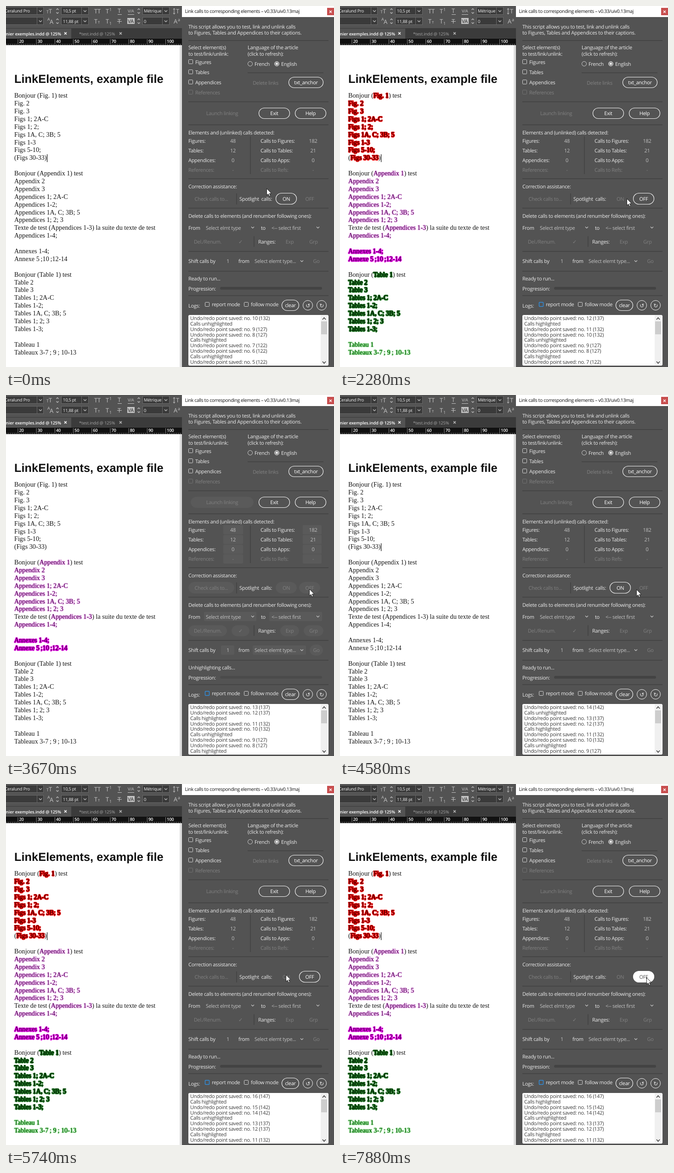
An HTML page that plays this animation: 714x784 px, repeating every 8 s.

```html
<!DOCTYPE html>
<html lang="en">
<head>
<meta charset="utf-8">
<title>Link calls to corresponding elements</title>
<style>
html, body { margin: 0; width: 100%; height: 100%; overflow: hidden; background: #fff; }
svg { position: absolute; left: 0; top: 0; width: 714px; height: 784px; }
text { font: 11px "Open Sans", "Noto Sans", sans-serif; letter-spacing: -.31px; fill: #ececec; white-space: pre; text-rendering: geometricPrecision; }
.mid { text-anchor: middle; }
.end { text-anchor: end; }
.dim { fill: #828282; }
.soft { fill: #c2c2c2; }
.title { font-size: 10.4px; letter-spacing: -.37px; fill: #111; }
.bar { font-size: 9.4px; letter-spacing: -.2px; fill: #f4f4f4; }
.tab { font-size: 9.3px; font-weight: 600; letter-spacing: -.1px; fill: #fff; }
.tab.idle { font-weight: 400; fill: #a6a6a6; }
.num { font-size: 9.4px; font-weight: 600; fill: #fff; }
.ico { font-size: 13px; fill: #c4c4c4; letter-spacing: -.5px; }
.sub { font-size: 9px; fill: #c4c4c4; }
.log text { fill: #3a3a3a; }
.head { font: bold 25.4px "Liberation Sans", Arial, sans-serif; letter-spacing: 0; fill: #111; }
.sep { stroke: #454545; stroke-width: 2; }
.chev { fill: none; stroke: #c8c8c8; stroke-width: 1.2; }
.field { fill: #3a3a3a; stroke: #6a6a6a; }
.box { fill: none; stroke: #d4d4d4; }
.box.dimbox { stroke: #727272; }
.blue #report { stroke: #2f8fe0; stroke-width: 1.4; }
.btn rect { fill: none; stroke: #f2f2f2; stroke-width: 1.2; }
.btn text { fill: #fff; }
.off rect, .well, .deepwell { fill: none; }
.off text { fill: #808080; }
.busy .off:not(.launch) rect, .deep .launch rect { fill: #5a5a5a; stroke: #5a5a5a; }
.busy .well, .deep .deepwell { fill: #5a5a5a; }
.hover rect { fill: #fff; stroke: #fff; stroke-width: 1.2; }
.hover text { fill: #505050; }
.press rect { fill: #459df2; stroke: #459df2; stroke-width: 1.2; }
.press text { fill: #fff; }
#track { fill: #434343; }
.busy #track { fill: #4b4b4b; }
#doc { position: absolute; left: 18px; top: 186.2px; color: #141414;
  font: 14.2px/16.9px "Liberation Serif", "Times New Roman", serif; white-space: pre; }
#doc div { height: 16.9px; }
#doc span { --a: 0 0 2px var(--c); }
.fig { --c: #ff0000; --k: #380000; }
.app { --c: #ee84ee; --k: #4a1050; }
.ann { --c: #f400f4; --k: #48004e; }
.tab1 { --c: #1d7a22; --k: #001a02; }
.tab2 { --c: #4fe04f; --k: #06400a; }
.all span, .part .app, .part .ann { color: var(--k); text-shadow: var(--a), var(--a), var(--a); }
.all .fig, .all .ann, .all .tab1, .part .ann {
  -webkit-text-stroke: .3px var(--k);
  text-shadow: 1.5px 0 var(--c), -1.5px 0 var(--c), 0 1.5px var(--c), 0 -1.5px var(--c),
    1px 1px var(--c), -1px -1px var(--c), 1px -1px var(--c), -1px 1px var(--c), var(--a), var(--a);
}
</style>
</head>
<body>
<svg id="ui" viewBox="0 0 714 784"></svg>
<div id="doc"></div>
<svg viewBox="0 0 714 784">
  <g id="tip">
    <rect x="2" y="2" width="74" height="17" fill="#000" opacity=".25"/>
    <rect id="tipBox" x=".5" y=".5" width="74" height="16" fill="#fff" stroke="#767676"/>
    <text id="tipText" x="5" y="12" style="fill:#555"></text>
  </g>
  <g id="ring" fill="none" stroke-width="3">
    <circle r="5.5" stroke="#2b8ae2"/>
    <path d="M0-5.500A5.500 5.500 0 0 1 5.500 0" stroke="#62b0f6"/>
  </g>
  <path id="arrow" d="M.5.5V15L3.8 12 6.2 17.2 8.6 16.2 6.3 11.2H10.9Z" fill="#fff" stroke="#111" stroke-width=".9"/>
</svg>
<script>
const $ = id => document.getElementById(id);
const out = [];
const add = s => out.push(s);
const text = (x, y, s, cls = '') => add(`<text x="${x}" y="${y}" class="${cls}">${s}</text>`);
const rect = (x, y, w, h, fill) => add(`<rect x="${x}" y="${y}" width="${w}" height="${h}" fill="${fill}"/>`);
const well = (x, y, w, h, cls = 'well') => add(`<rect x="${x}" y="${y}" width="${w}" height="${h}" rx="2" class="${cls}"/>`);
const line = (x1, y1, x2, y2) => add(`<path class="sep" d="M${x1} ${y1}L${x2} ${y2}"/>`);
const chev = (x, y, up = 1, r = 3) => add(`<path class="chev" d="M${x - r} ${y - up * r / 2}l${r} ${up * r}l${r} ${-up * r}"/>`);
const check = (x, y, cls = '', id = '') => add(`<rect ${id && `id="${id}"`} class="box ${cls}" x="${x}.5" y="${y}.5" width="9" height="9" rx="1"/>`);
const pill = (x, y, w, h, label, cls = 'btn', id = '') => add(
  `<g ${id && `id="${id}"`} class="${cls}"><rect x="${x + .5}" y="${y + .5}" width="${w - 1}" height="${h - 1}" rx="${h / 2}"/>` +
  `<text class="mid" x="${x + w / 2}" y="${y + h / 2 + 4}">${label}</text></g>`);

function drawEditor() {
  rect(0, 0, 383, 48, '#535353');
  rect(0, 48, 383, 23, '#3b3b3b');
  rect(0, 49, 142, 22, '#535353');
  rect(0, 71, 383, 14, '#111');
  rect(378, 85, 5, 699, '#dedede');
  for (const y of [11, 33]) {
    for (const [x, w] of [[-5, 88], [120, 60], [297, 59]])
      add(`<rect class="field" x="${x}.5" y="${y - 8.5}" width="${w - 1}" height="16"/>`);
    for (const x of [75, 172, 348]) chev(x, y);
    for (const x of [112, 289]) { chev(x, y - 4, -1, 2.5); chev(x, y + 4, 1, 2.5); }
    add(`<path d="M67.5 ${y - 8}v16M164.5 ${y - 8}v16M340.5 ${y - 8}v16" stroke="#6a6a6a"/>`);
  }
  text(52, 14, 'Ceralund Pro', 'bar end');
  text(124, 14, '10,5 pt', 'bar'); text(124, 37, '11,88 pt', 'bar');
  text(300, 14, 'Métrique', 'bar'); text(300, 37, '0', 'bar');
  text(88, 16, 'T', 'sub'); text(93, 16, 'T', 'ico');
  text(90, 32, 'A', 'sub'); text(95, 39, 'A', 'ico');
  text(192, 16, 'TT', 'ico'); text(192, 38, 'T', 'ico'); text(200, 38, 'т', 'sub');
  text(217, 16, 'T', 'ico'); text(225, 11, '1', 'sub');
  text(217, 38, 'T', 'ico'); text(225, 41, '1', 'sub');
  text(243, 15, 'T', 'ico'); text(243, 38, 'T', 'ico');
  add('<path d="M243 18.500h9M242 33.500h10M265 18.500h14M366 6v11M364 8l2-3 2 3M364 15l2 3 2-3" fill="none" stroke="#c4c4c4"/>');
  text(265, 14, 'V/A', 'sub');
  rect(264, 26, 16, 13, '#c4c4c4');
  add('<text x="265" y="37" style="font-size:11px;fill:#444;font-weight:600">VA</text>');
  text(370, 16, 'T', 'ico'); text(365, 38, 'A', 'ico'); text(374, 33, 'a', 'sub');
  text(120, 63.5, 'nier exemples.indd @ 125%', 'tab end');
  text(159, 63.5, '*test.indd @ 125%', 'tab idle');
  add('<path d="M127 57l5 5m0-5l-5 5" stroke="#fff" stroke-width="1.500"/><path d="M247 57l5 5m0-5l-5 5" stroke="#bbb" stroke-width="1.500"/>');
  let ticks = '';
  for (let i = 0; i < 95; i++) {
    const x = (1.9 + i * 4.02).toFixed(1), major = i % 10 === 6;
    ticks += `M${x} ${major ? 72 : 82}V85`;
    if (major) text(+x + 2.5, 80, i + 14, 'num');
  }
  add(`<path d="${ticks}" stroke="#b0b0b0" stroke-width=".8"/>`);
  text(18, 167, 'LinkElements, example file', 'head');
  add('<rect id="caret" x="89" y="322" width="1.200" height="17" fill="#111"/>');
}

function drawPanel() {
  rect(383, 0, 331, 784, '#535353');
  rect(383, 0, 331, 24, '#fff');
  text(389.5, 15, 'Link calls to corresponding elements – v0.33/uiv0.13maj', 'title');
  rect(699, 4, 15, 16, '#c84f4f');
  add('<path d="M704 10l5 5m0-5l-5 5" stroke="#fff" stroke-width="1.300"/>');
  text(397, 49, 'This script allows you to test, link and unlink calls');
  text(397, 62, 'to Figures, Tables and Appendices to their captions.');
  for (const y of [75, 208, 258, 375, 439, 533, 576, 629]) line(397, y, 702, y);

  text(397, 94, 'Select element(s)'); text(397, 108, 'to test/link/unlink:');
  text(526, 94, 'Language of the article'); text(526, 108, '(click to refresh):');
  ['Figures', 'Tables', 'Appendices', 'References'].forEach((s, i) => {
    check(397, 116 + i * 22, i > 2 ? 'dimbox' : '');
    text(412, 125.5 + i * 22, s, i > 2 ? 'dim' : '');
  });
  add('<circle class="box" cx="531.500" cy="125.500" r="5"/><circle cx="589.500" cy="125.500" r="5" fill="#9a9a9a" stroke="#d0d0d0"/><circle cx="589.500" cy="125.500" r="2" fill="#fff"/>');
  text(541, 130, 'French'); text(599, 130, 'English');
  line(526, 145, 691, 145);
  text(565, 171, 'Delete links', 'mid dim');
  pill(615, 154, 76, 24, 'txt_anchor');
  pill(402, 221, 137, 24, 'Launch linking', 'off launch');
  pill(550, 221, 68, 24, 'Exit'); pill(629, 221, 68, 24, 'Help');

  text(397, 279, 'Elements and (unlinked) calls detected:');
  line(532, 283, 532, 365);
  [['Figures:', 48, 'Calls to Figures:', 182], ['Tables:', 12, 'Calls to Tables:', 21],
   ['Appendices:', 0, 'Calls to Apps:', 0], ['References:', '-', 'Calls to Refs:', '-']].forEach((r, i) => {
    const y = 296.5 + i * 21.2, dim = i > 2 ? 'dim' : '';
    well(473, y - 14, 43, 20, 'deepwell'); well(646, y - 14, 41, 20, 'deepwell');
    text(397, y, r[0], dim); text(494, y, r[1], 'mid ' + (dim || 'soft'));
    text(554, y, r[2], dim); text(668.5, y, r[3], 'mid ' + (dim || 'soft'));
  });

  text(397, 396, 'Correction assistance:');
  pill(397, 406, 100, 25, 'Check calls to...', 'off');
  line(502, 407, 502, 431);
  text(508, 423, 'Spotlight  calls:');
  pill(587, 406, 46, 25, 'ON', 'btn', 'on');
  pill(638, 406, 46, 25, 'OFF', 'off', 'off');

  text(397, 460, 'Delete calls to elements (and renumber following ones):');
  well(431, 471, 114, 20); well(573, 471, 115, 20);
  text(397, 485.5, 'From'); text(435, 485.5, 'Select elmt type', 'soft'); chev(537, 481);
  text(555, 485.5, 'to'); text(578, 485.5, '&lt;-- select first', 'soft'); chev(679, 481);
  pill(397, 500, 84, 24, 'Del./Renum.', 'off'); pill(491, 500, 39, 24, '✓', 'off');
  line(540, 500, 540, 523);
  text(549, 516, 'Ranges:');
  pill(597, 500, 41, 24, 'Exp', 'off'); pill(648, 500, 43, 24, 'Grp', 'off');

  well(468, 544, 29, 20); well(537, 544, 116, 20);
  text(397, 558, 'Shift calls by'); text(483, 558, '1', 'mid soft'); text(506, 558, 'from');
  text(541, 558, 'Select elemt type...', 'soft'); chev(644, 554);
  pill(661, 542, 29, 24, 'Go', 'off');
  add('<text id="status" x="397" y="595.500"></text>');
  text(397, 617.5, 'Progression:');
  add('<rect id="track" x="466" y="610" width="222" height="6" rx="3"/>');

  text(397, 655, 'Logs:');
  check(433, 643, '', 'report'); text(448, 652, 'report mode');
  check(518, 643); text(533, 652, 'follow mode');
  pill(600, 638, 38, 24, 'clear');
  for (const [x, s] of [[657, '↺'], [687, '↻']])
    add(`<circle class="box" cx="${x}" cy="650" r="10.500" style="stroke:#f2f2f2"/><text class="mid" x="${x}" y="654.500" style="font-family:'DejaVu Sans',sans-serif;font-size:12px">${s}</text>`);
  add('<rect x="397" y="671" width="305" height="110" rx="3" fill="#fff"/><clipPath id="clip"><path d="M398 672h286v108H398z"/></clipPath><g class="log" clip-path="url(#clip)">');
  for (let i = 0; i < 10; i++) add(`<text id="row${i}" x="401" y="${682 + i * 11.85}"></text>`);
  add('</g>');
  rect(685, 672, 15, 108, '#f0f0f0'); rect(686, 685, 13, 28, '#cdcdcd');
  add('<path d="M689 681l3.500-4 3.500 4M689 772l3.500 4 3.500-4" fill="none" stroke="#404040" stroke-width="1.600"/>');
}

drawEditor();
drawPanel();
$('ui').innerHTML = out.join('');

// Brackets mark the calls that get a spotlight.
const thin = '\u2009';
const groups = [
  ['fig', 'Bonjour ([Fig. 1]) test|[Fig. 2]|[Fig. 3]|[Figs 1; 2A-C]|[Figs 1; 2;]|[Figs 1A, C; 3B; 5]|[Figs 1-3]|[Figs 5-10;]|([Figs 30-33])|'],
  ['app', 'Bonjour ([Appendix 1]) test|[Appendix 2]|[Appendix 3]|[Appendices 1; 2A-C]|[Appendices 1-2;]|[Appendices 1A, C; 3B; 5]|[Appendices 1; 2; 3]|Texte de test ([Appendices 1-3]) la suite du texte de test|[Appendices 1-4;]|'],
  ['ann', `[Annexes 1-4;]|[Annexe 5${thin};10${thin};12-14]|`],
  ['tab1', 'Bonjour ([Table 1]) test|[Table 2]|[Table 3]|[Tables 1; 2A-C]|[Tables 1-2;]|[Tables 1A, C; 3B; 5]|[Tables 1; 2; 3]|[Tables 1-3;]|'],
  ['tab2', `[Tableau 1]|[Tableaux 3-7${thin}; 9${thin}; 10-13]`]
];
$('doc').innerHTML = groups.map(([cls, lines]) => lines.split('|').map(s =>
  `<div>${s.replace('[', `<span class="${cls}">`).replace(']', '</span>')}</div>`).join('')).join('');

function logRows(n) {
  const rows = [];
  for (; rows.length < 10; n--) {
    rows.push(`Undo/redo point saved: no. ${n} (${122 + 5 * Math.max(0, Math.floor((n - 6) / 2))})`);
    if (n % 2 === 0) rows.push(n % 4 ? 'Calls unhighlighted' : 'Calls highlighted');
  }
  return rows;
}

const ready = 'Ready to run...';
const onTip = ['Highlight calls', 74], offTip = ['Unhighlight calls', 86];
const idleOff = { on: 'btn', off: 'off', mode: '', status: ready };
const idleOn = { on: 'off', off: 'btn', mode: 'all blue', status: ready };
// [time, changes that stay until set again]
const steps = [
  [0, { ...idleOff, at: [567, 396], ring: null, tip: null, log: 10, caret: 1 }],
  [150, { at: [596, 403] }],
  [300, { at: [613, 413], on: 'hover' }],
  [450, { at: [614, 414] }],
  [1040, { tip: [614, 433, 1, onTip] }],
  [1190, { tip: null, at: null, ring: [615, 417], on: 'off', mode: 'busy blue', status: 'Highlighting calls...', log: 11 }],
  [1340, { at: [614, 415], ring: null }],
  [1490, { ...idleOn, log: 12 }],
  [2280, { at: [624, 418] }],
  [2430, { at: [631, 419] }],
  [2550, { at: [641, 419], off: 'hover' }],
  [2670, { at: [651, 420] }],
  [2790, { at: [659, 420] }],
  [2940, { at: [660, 421] }],
  [3220, { tip: [660, 438, .5, offTip] }],
  [3370, { tip: [660, 438, 1, offTip] }],
  [3670, { tip: null, off: 'off', mode: 'busy deep part blue', status: 'Unhighlighting calls...', log: 13, caret: 0 }],
  [3790, { mode: 'busy deep blue' }],
  [3910, { ...idleOff, log: 14, caret: 1 }],
  [4340, { at: [656, 422] }],
  [4460, { at: [650, 422] }],
  [4580, { at: [645, 422] }],
  [4730, { at: [636, 421] }],
  [4880, { at: [630, 420], on: 'hover' }],
  [5000, { at: [622, 417] }],
  [5120, { at: [614, 415] }],
  [5240, { at: [609, 414] }],
  [5500, { on: 'press' }],
  [5620, { at: null, ring: [609, 416], mode: 'busy deep', log: 15 }],
  [5740, { ...idleOn, at: [609, 414], ring: null, log: 16 }],
  [7200, { at: [628, 418], tip: [609, 433, 1, onTip] }],
  [7325, { at: [645, 419], off: 'hover', tip: null }],
  [7450, { at: [661, 420], tip: [639, 437, 1, offTip] }],
  [7600, { at: [667, 420] }],
  [7880, { tip: null }]
];

function place(el, p) {
  el.style.display = p ? '' : 'none';
  if (p) el.setAttribute('transform', `translate(${p[0]} ${p[1]})`);
}

function show(s) {
  document.body.className = s.mode;
  $('on').setAttribute('class', s.on);
  $('off').setAttribute('class', s.off);
  $('status').textContent = s.status;
  $('caret').style.display = s.caret ? '' : 'none';
  logRows(s.log).slice(0, 10).forEach((r, i) => $('row' + i).textContent = r);
  place($('arrow'), s.at);
  place($('ring'), s.ring);
  place($('tip'), s.tip);
  if (s.tip) {
    const [, , alpha, [label, width]] = s.tip;
    $('tip').style.opacity = alpha;
    $('tipText').textContent = label;
    for (const r of $('tip').querySelectorAll('rect')) r.setAttribute('width', width);
  }
}

let last = -1;
function tick() {
  const now = performance.now() % 8000;
  const past = steps.filter(([t]) => t <= now);
  if (past.length !== last) {
    last = past.length;
    show(Object.assign({}, ...past.map(p => p[1])));
  }
  requestAnimationFrame(tick);
}
tick();
</script>
</body>
</html>
```
